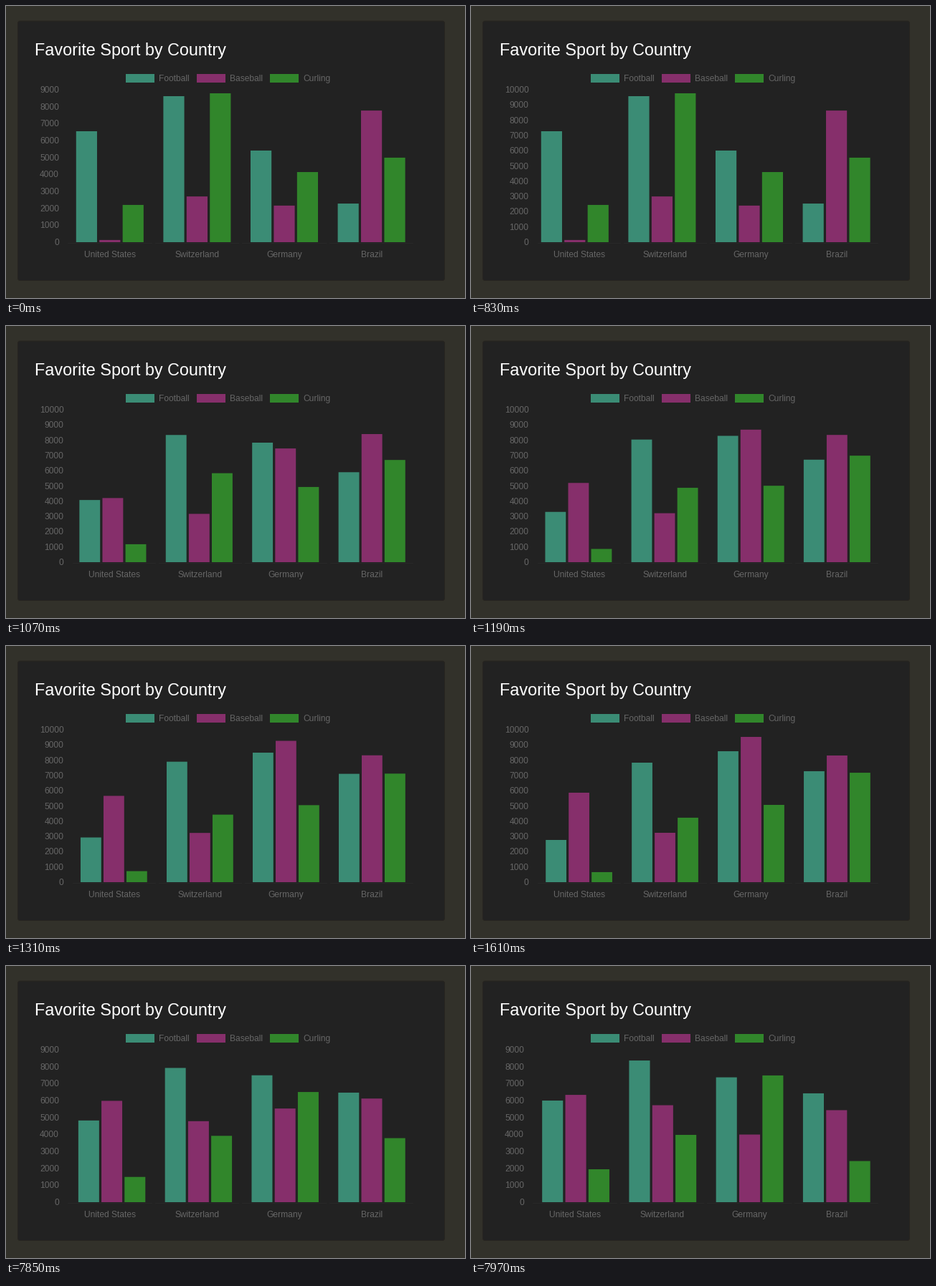
Recreate the animation shown at these times as a matplotlib script. Size 640 by 408 pixels, loop 8000 ms.

```python
import matplotlib.pyplot as plt
import numpy as np
from matplotlib.animation import FuncAnimation
from matplotlib.patches import FancyBboxPatch, Rectangle

W, H, DPI = 640, 408, 64
LOOP, STEP = 8000, 20
TICK, RATE = 30, 0.0372  # redraw interval in ms, tween progress per redraw
TOP, BASE, RIGHT = 117, 330, 570.4
GREY = "#666666"
SPORTS = [("Football", "#3b8c75", 167), ("Baseball", "#862f6b", 266),
          ("Curling", "#31862b", 368)]
COUNTRIES = ["United States", "Switzerland", "Germany", "Brazil"]

plt.rcParams["font.family"] = "Liberation Sans"
fig = plt.figure(figsize=(W / DPI, H / DPI), dpi=DPI, facecolor="#32312a")
ax = fig.add_axes([0, 0, 1, 1])
ax.set(xlim=(0, W), ylim=(H, 0))
ax.axis("off")


def label(x, y, text="", size=12, color=GREY, ha="left"):
    return ax.text(x, y, text, fontsize=size * 72 / DPI, color=color,
                   ha=ha, va="baseline")


def box(x, y, w, h, color, **kw):
    return ax.add_patch(Rectangle((x, y), w, h, fc=color, lw=0, **kw))


class Chart:
    """Axis range, margins and bars that follow from votes in thousands."""

    def __init__(self, *votes):
        votes = np.array(votes)
        self.peak = int(np.ceil(votes.max()))
        digits = len(str(self.peak * 1000))
        self.left = 57.6 + 6.6 * digits
        self.width = (RIGHT - self.left) / len(COUNTRIES)
        slot = self.width * 0.8 / len(SPORTS)
        group, sport = np.indices(votes.shape)
        x = self.left + self.width * (group + 0.1) + slot * (sport + 0.05)
        height = votes / self.peak * (BASE - TOP)
        self.bars = np.stack([x, height, np.full_like(x, slot * 0.9)], axis=-1)


# One row per country, one vote count per sport.
first = Chart((6.55, .13, 2.2), (8.62, 2.7, 8.79),
              (5.41, 2.16, 4.14), (2.28, 7.77, 4.99))
second = Chart((2.77, 5.87, .66), (7.84, 3.24, 4.23),
               (8.59, 9.53, 5.07), (7.28, 8.31, 7.18))
third = Chart((6.98, 6.63, 2.32), (8.73, 6.51, 4.02),
              (7.27, 2.71, 8.3), (6.39, 4.86, 1.3))

ax.add_patch(FancyBboxPatch((19.5, 24), 589, 356.5, fc="#222222", ec="#272420",
                            lw=72 / DPI, boxstyle="round,pad=3,rounding_size=3"))
label(40.5, 69, "Favorite Sport by Country", 23.35, "#ffffff")
for name, color, x in SPORTS:
    box(x, 95, 40, 12, color)
    label(x + 46, 105, name)

ticks = [label(0, 0, ha="right") for _ in range(second.peak + 1)]
names = [label(0, 351, c, ha="center") for c in COUNTRIES]
floors = [box(0, BASE + 1, 1, 1, "#282828") for _ in COUNTRIES]
bars = [[box(0, BASE, 1, 0, color, snap=False) for _, color, _ in SPORTS]
        for _ in COUNTRIES]
artists = ticks + names + floors + sum(bars, [])


def tween(old, new, start, lead, ms):
    """Ease the bars out (quartic) in steps of one redraw."""
    k = max(0, (ms - start) // TICK)
    t = np.clip(RATE * (k + lead), 0, 1)
    return new.bars + (old.bars - new.bars) * (1 - t) ** 4


def state(ms):
    """Return the visible axis layout and the bar geometry."""
    if ms < 830:
        return first, first.bars
    if ms < 7700:
        return second, tween(first, second, 830, -0.85, ms)
    return third, tween(second, third, 7730, 0.5, ms)


def draw(i):
    chart, geometry = state(i * STEP + STEP // 2)
    for n, tick in enumerate(ticks):
        tick.set_text(str(n * 1000) if n <= chart.peak else "")
        y = BASE - n / chart.peak * (BASE - TOP)
        tick.set_position((chart.left - 10, round(y) + 4))
    for g, (name, floor) in enumerate(zip(names, floors)):
        x = chart.left + g * chart.width
        name.set_x(x + chart.width / 2)
        floor.set_x(x + 2)
        floor.set_width(chart.width - 4)
        for bar, (bx, height, width) in zip(bars[g], geometry[g]):
            bar.set_bounds(bx, BASE - height, width, height)
    return artists


anim = FuncAnimation(fig, draw, frames=LOOP // STEP, interval=STEP,
                     init_func=lambda: draw(0), repeat=True, repeat_delay=0)
plt.show()
```
